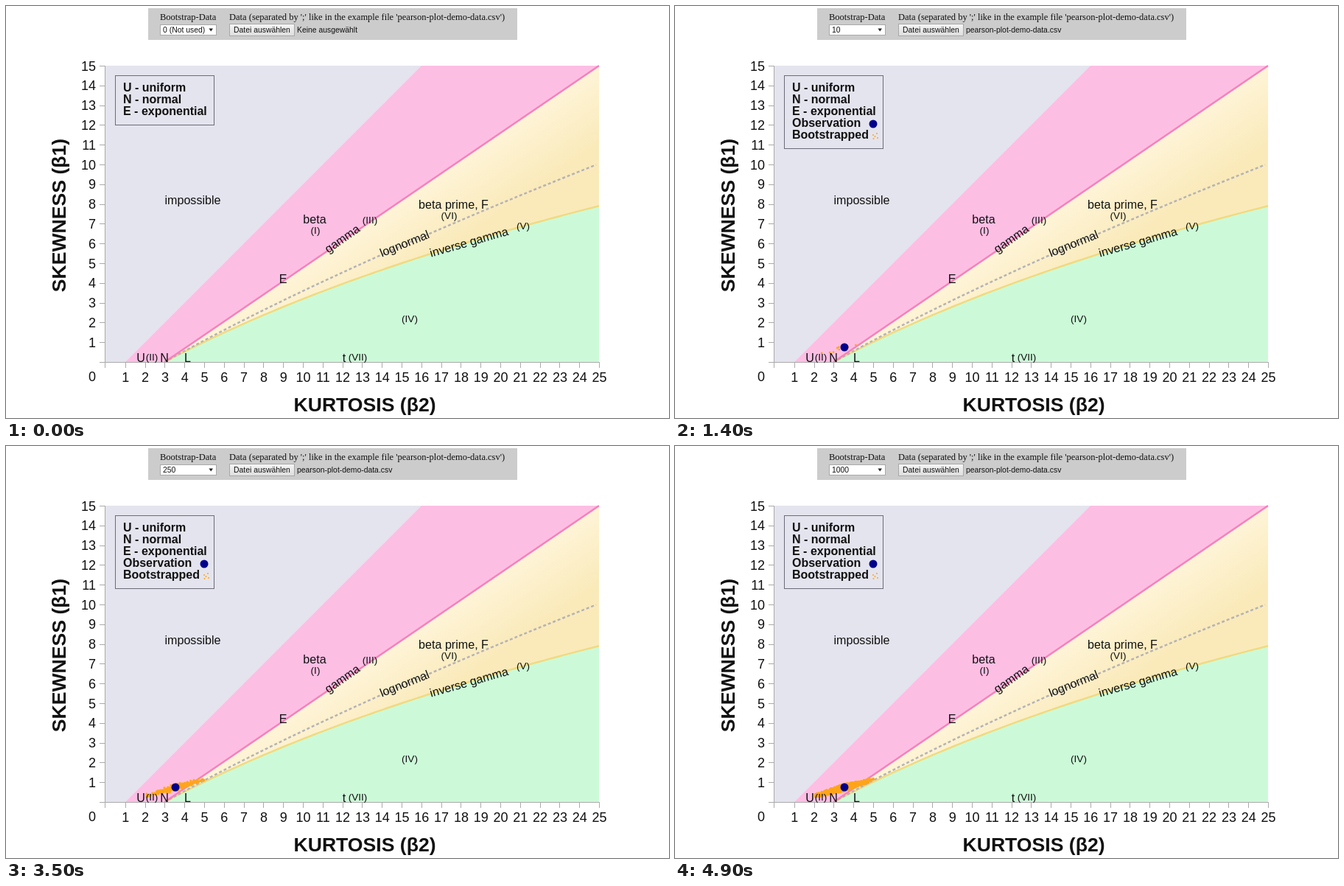
An HTML page with a canvas for the animation above (5600 ms loop, 900 px wide and 559 px high).

```html
<!DOCTYPE html>
<html lang="en">
<head>
<meta charset="utf-8">
<title>Pearson plot</title>
<style>
html, body { margin: 0; width: 100%; height: 100%; overflow: hidden; background: #fff; }
canvas { display: block; }
</style>
</head>
<body>
<canvas id="stage" width="900" height="559"></canvas>
<script>
const ctx = document.getElementById('stage').getContext('2d');
const STEP = 700;
const SANS = '"Liberation Sans", Arial, sans-serif';
const SERIF = '"Liberation Serif", "Times New Roman", serif';
const STATES = [
  { choice: '0 (Not used)', file: false, samples: 0 },
  { choice: '0 (Not used)', file: true, samples: 0 },
  ...[10, 50, 100, 250, 500, 1000].map(n => ({ choice: String(n), file: true, samples: n }))
];

const UNIT = 26.8;
const px = kurtosis => 135 + kurtosis * UNIT;
const py = skewness => 483 - skewness * UNIT;

function text(str, x, y, size, { align = 'left', family = SANS, weight = '', angle = 0, color = '#111' } = {}) {
  ctx.save();
  ctx.translate(x, y);
  ctx.rotate(angle * Math.PI / 180);
  ctx.font = `${weight} ${size}px ${family}`;
  ctx.textAlign = align;
  ctx.fillStyle = color;
  ctx.fillText(str, 0, 0);
  ctx.restore();
}

// Text centred on a point, judged by its capital height.
function label(str, x, y, size = 16.1, angle = 0, weight = '') {
  const a = angle * Math.PI / 180, drop = size * 0.33;
  text(str, x - Math.sin(a) * drop, y + Math.cos(a) * drop, size, { align: 'center', angle, weight });
}

function trace(points) {
  ctx.beginPath();
  points.forEach(([x, y]) => ctx.lineTo(x, y));
}

function area(points, fill) {
  trace(points);
  ctx.fillStyle = fill;
  ctx.fill();
}

function line(points, color, width, dash = []) {
  trace(points);
  ctx.strokeStyle = color;
  ctx.lineWidth = width;
  ctx.setLineDash(dash);
  ctx.stroke();
  ctx.setLineDash([]);
}

function dot(x, y, r, color) {
  ctx.beginPath();
  ctx.arc(x, y, r, 0, 7);
  ctx.fillStyle = color;
  ctx.fill();
}

function box(x, y, w, h, fill, stroke) {
  ctx.fillStyle = fill;
  ctx.fillRect(x, y, w, h);
  ctx.strokeStyle = stroke;
  ctx.lineWidth = 1;
  ctx.strokeRect(x + 0.5, y + 0.5, w - 1, h - 1);
}

function gradient(x0, y0, x1, y1, from, to) {
  const g = ctx.createLinearGradient(x0, y0, x1, y1);
  g.addColorStop(0, from);
  g.addColorStop(1, to);
  return g;
}

// Pearson type V boundary, solved for the shape parameter at each kurtosis.
const inverseGamma = Array.from({ length: 89 }, (_, i) => {
  const excess = i / 4;
  if (!excess) return [px(3), py(0)];
  const b = 7 * excess + 30, c = 12 * excess + 66;
  const shape = (b + Math.sqrt(b * b - 4 * excess * c)) / (2 * excess);
  return [px(3 + excess), py(16 * (shape - 2) / (shape - 3) ** 2)];
});

const lognormal = Array.from({ length: 81 }, (_, i) => {
  const w = 1 + 0.721 * i / 80;
  return [px(w ** 4 + 2 * w ** 3 + 3 * w * w - 3), py((w - 1) * (w + 2) ** 2)];
});

function random(seed) {
  return () => {
    seed = (seed + 0x6D2B79F5) | 0;
    let t = Math.imul(seed ^ seed >>> 15, 1 | seed);
    t = t + Math.imul(t ^ t >>> 7, 61 | t) ^ t;
    return ((t ^ t >>> 14) >>> 0) / 4294967296;
  };
}

// Elongated scatter around the observation, thinner towards its ends.
function cloud(count) {
  const rnd = random(count);
  const normal = () => Math.sqrt(-2 * Math.log(1 - rnd())) * Math.cos(2 * Math.PI * rnd());
  return Array.from({ length: count }, () => {
    const along = Math.max(-37, Math.min(41, 17 * normal()));
    const spread = Math.max(-2, Math.min(2, normal())) * (2.5 - Math.abs(along) / 30);
    return [228 + along, 464 - 0.28 * along + spread];
  });
}
STATES.forEach(state => { state.points = cloud(state.samples); });

function drawControls({ choice, file }) {
  ctx.fillStyle = '#ccc';
  ctx.fillRect(193, 3, 501, 43);
  text('Bootstrap-Data', 209, 19, 12.5, { family: SERIF });
  text("Data (separated by ';' like in the example file 'pearson-plot-demo-data.csv')", 303, 19, 12.5, { family: SERIF });
  box(209, 25, 77, 15, '#fff', '#a9a9a9');
  text(choice, 213, 35.5, 10.4);
  area([[275.5, 30.5], [281, 30.5], [278.2, 34.5]], '#222');
  box(303, 24, 89, 17, gradient(0, 24, 0, 41, '#f6f6f6', '#dddddd'), '#a8a8a8');
  text('Datei auswählen', 309, 35.5, 10.4);
  text(file ? 'pearson-plot-demo-data.csv' : 'Keine ausgewählt', 395, 35.5, 10.4);
}

function drawRegions() {
  const origin = [px(3), py(0)], corner = [px(25), py(15)];
  area([[px(0), py(0)], [px(0), py(15)], [px(16), py(15)], [px(1), py(0)]], '#e4e4ee');
  area([[px(1), py(0)], [px(16), py(15)], corner, origin], '#fdbee4');
  area([origin, corner, ...inverseGamma.slice().reverse()], gradient(510, 282, 561, 356, '#fef4d7', '#faeaba'));
  area([...inverseGamma, [px(25), py(0)]], '#ccfad8');
  line(inverseGamma, '#f1da80', 2.5);
  line(lognormal, '#b5b3b6', 2.5, [4, 3]);
  line([origin, corner], '#f780bb', 2.5);
}

function drawAxes() {
  const grey = '#aaa';
  line([[134.5, 81], [134.5, 491]], grey, 1);
  line([[127, 483.5], [806, 483.5]], grey, 1);
  for (let i = 1; i <= 25; i++) {
    const x = Math.round(px(i)) + 0.5;
    line([[x, 484], [x, 491]], grey, 1);
    text(i, px(i) + 0.5, 509.5, 18, { align: 'center' });
  }
  for (let i = 1; i <= 15; i++) {
    const y = Math.round(py(i)) + 0.5;
    line([[127, y], [134, y]], grey, 1);
    text(i, 122, py(i) + 6.5, 18, { align: 'right' });
  }
  text('0', 122, 508.5, 18, { align: 'right' });
  label('KURTOSIS (β2)', 487, 541, 26.6, 0, 'bold');
  label('SKEWNESS (β1)', 72, 284, 26.6, -90, 'bold');
}

function drawLegend({ file, samples }) {
  const rows = ['U - uniform', 'N - normal', 'E - exponential'];
  if (file) rows.push('Observation');
  if (samples) rows.push('Bootstrapped');
  box(148, 94, 135, [68, 84, 100][rows.length - 3], '#e4e4ee', '#6c6c78');
  rows.forEach((row, i) => text(row, 159, 116 + 16 * i, 16, { weight: 'bold' }));
  if (file) dot(269, 160, 5.5, '#00008b');
  if (samples) {
    [[269, 175], [274, 173], [271.5, 177], [269.5, 180], [275, 179]]
      .forEach(([x, y]) => dot(x, y, 1, '#ffa51a'));
  }
}

function drawLabels() {
  label('impossible', 253.5, 263.5);
  label('beta', 419, 290);
  label('beta prime, F', 607.5, 269.8);
  label('gamma', 456.5, 316, 16.1, -35);
  label('lognormal', 541, 322.5, 16.1, -22);
  label('inverse gamma', 628.5, 320.5, 16.1, -16);
  label('E', 376, 370.5);
  label('U', 183, 478);
  label('N', 215, 478);
  label('L', 246.5, 478);
  label('t', 459, 477.5);
  [['(I)', 420, 304.8], ['(II)', 198, 477], ['(III)', 494, 291], ['(IV)', 548, 424.8],
   ['(V)', 702, 298.8], ['(VI)', 601.5, 285], ['(VII)', 477.5, 476.8]]
    .forEach(([str, x, y]) => label(str, x, y, 13.6));
}

function draw(state) {
  ctx.fillStyle = '#fff';
  ctx.fillRect(0, 0, 900, 559);
  drawControls(state);
  drawRegions();
  drawAxes();
  drawLegend(state);
  state.points.forEach(([x, y]) => dot(x, y, 1.4, '#ffa51a'));
  drawLabels();
  if (state.file) dot(230, 463, 5.5, '#00008b');
}

let shown = -1;
const start = performance.now();
function tick() {
  const index = Math.floor((performance.now() - start) / STEP) % STATES.length;
  if (index !== shown) draw(STATES[shown = index]);
  requestAnimationFrame(tick);
}
tick();
</script>
</body>
</html>
```
